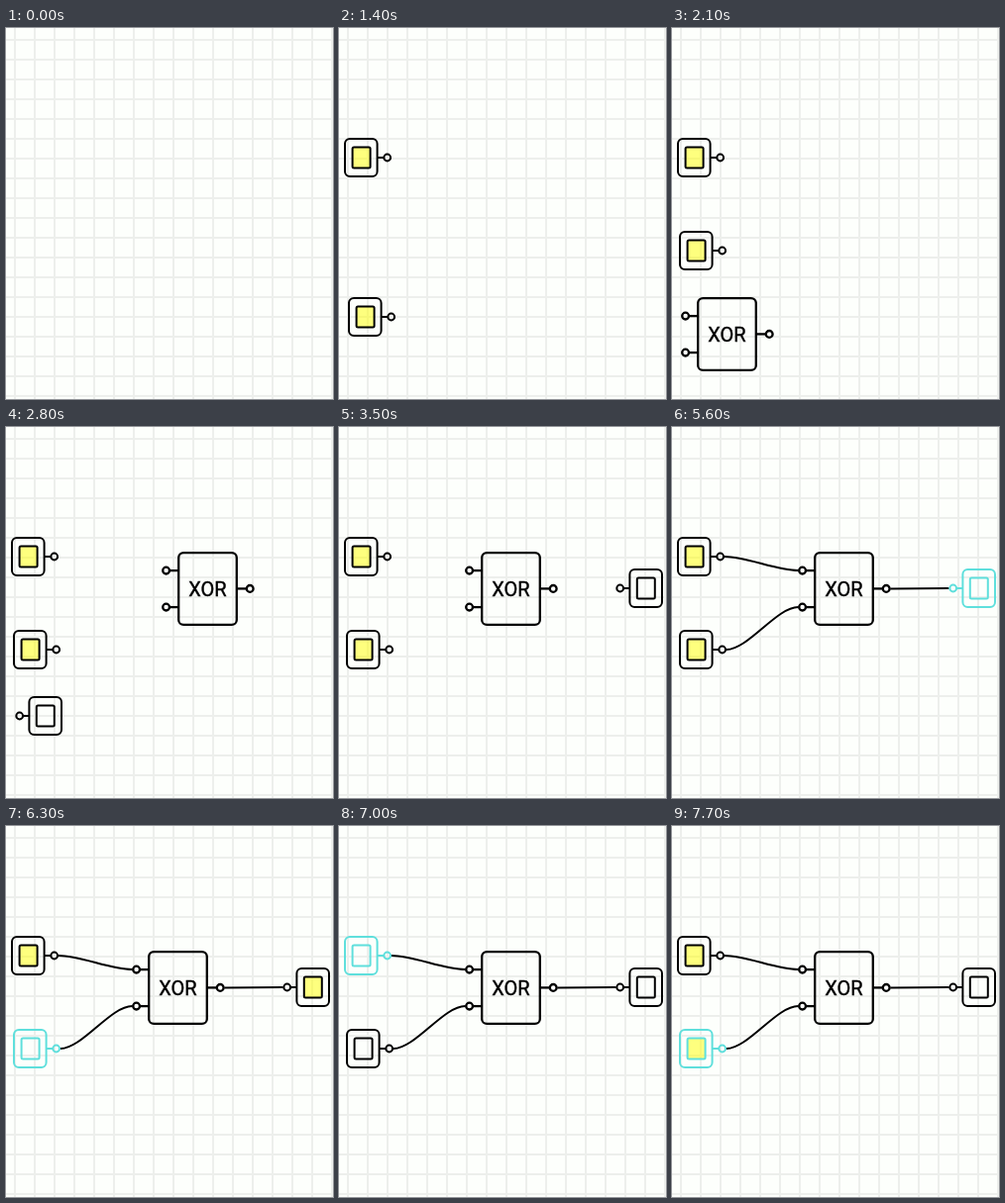
An HTML page with a canvas for the animation above (8400 ms loop, 330 px wide and 375 px high).

```html
<!DOCTYPE html>
<html>
<head>
<meta charset="utf-8">
<style>
  html, body { margin: 0; width: 100%; height: 100%; overflow: hidden; background: #fdfffc; }
  canvas { display: block; width: 330px; height: 375px; }
</style>
</head>
<body>
<canvas id="stage" width="330" height="375"></canvas>
<script>
const ctx = document.getElementById('stage').getContext('2d');
const STEP = 700, STEPS = 12;
const BLACK = '#000', CYAN = '#5fdfdc', GLOW = 'rgba(255, 255, 0, 0.5)';

function box(x, y, w, h, r, lit) {
  ctx.beginPath();
  ctx.roundRect(x, y, w, h, r);
  if (lit) {
    ctx.fillStyle = GLOW;
    ctx.fill();
  }
  ctx.stroke();
}

function pin(x, y, edge) {
  ctx.beginPath();
  ctx.moveTo(x + Math.sign(edge - x) * 3.5, y);
  ctx.lineTo(edge, y);
  ctx.stroke();
  ctx.beginPath();
  ctx.arc(x, y, 3.4, 0, 7);
  ctx.stroke();
}

function part(x, y, active, width, draw) {
  ctx.save();
  ctx.translate(x, y);
  ctx.strokeStyle = active ? CYAN : BLACK;
  ctx.lineWidth = width;
  draw();
  ctx.restore();
}

function toggle(x, y, on, active) {
  part(x, y, active, 2, () => {
    pin(43.7, 20, 33.6);
    box(1, 1, 32.6, 38, 5);
    box(8.6, 9.5, 18, 21, 1.5, on);
  });
}

function lamp(x, y, on, active) {
  part(x, y, active, 2, () => {
    pin(4.7, 20, 14.4);
    box(14.4, 1, 32.6, 38, 5);
    box(21.8, 9.5, 18, 21, 1.5, on);
  });
}

function gate(x, y, active) {
  part(x, y, active, 2.3, () => {
    pin(4.6, 19.1, 17.2);
    pin(4.6, 56.1, 17.2);
    pin(89.2, 37.4, 75.8);
    box(17.2, 1.1, 58.6, 72.8, 5);
    ctx.fillStyle = ctx.strokeStyle;
    ctx.font = '20px Roboto, sans-serif';
    ctx.textAlign = 'center';
    ctx.fillText('XOR', 46.5, 44.5);
    ctx.lineWidth = 0.4;
    ctx.strokeText('XOR', 46.5, 44.5);
  });
}

function wire(x1, y1, x2, y2) {
  const bend = (x2 - x1) * 0.3;
  ctx.strokeStyle = BLACK;
  ctx.lineWidth = 2;
  ctx.beginPath();
  ctx.moveTo(x1, y1);
  ctx.bezierCurveTo(x1 + bend, y1, x2 - bend, y2, x2, y2);
  ctx.stroke();
}

function grid() {
  ctx.fillStyle = '#fdfffc';
  ctx.fillRect(0, 0, 330, 375);
  ctx.fillStyle = '#edefec';
  for (let x = 8; x < 330; x += 20) ctx.fillRect(x, 0, 2, 375);
  for (let y = 11; y < 375; y += 20) ctx.fillRect(0, y, 330, 2);
}

function render(n) {
  grid();
  const a = n !== 10;             // upper input
  const b = n !== 9 && n !== 10;  // lower input
  if (n >= 6) wire(55, 225, 127.4, 182);
  if (n >= 7) wire(53, 131, 127.4, 145);
  if (n >= 8) wire(220.4, 163.4, 279.5, 163);

  // New parts appear at (9, 272) before being moved into place.
  if (n >= 2) toggle(5, 111, a, n === 10);
  if (n >= 3) toggle(7, 205, b, n === 9 || n === 11);
  else if (n >= 1) toggle(9, 272, true);

  if (n === 3) gate(9, 272);
  else if (n === 4) gate(157, 126);
  else if (n >= 5) gate(127, 126, n === 6 || n === 7);

  if (n === 4) lamp(9, 272);
  else if (n >= 5) lamp(279, 143, a !== b, n === 8);
}

function tick() {
  render(Math.floor(performance.now() / STEP) % STEPS);
  requestAnimationFrame(tick);
}
tick();
</script>
</body>
</html>
```
